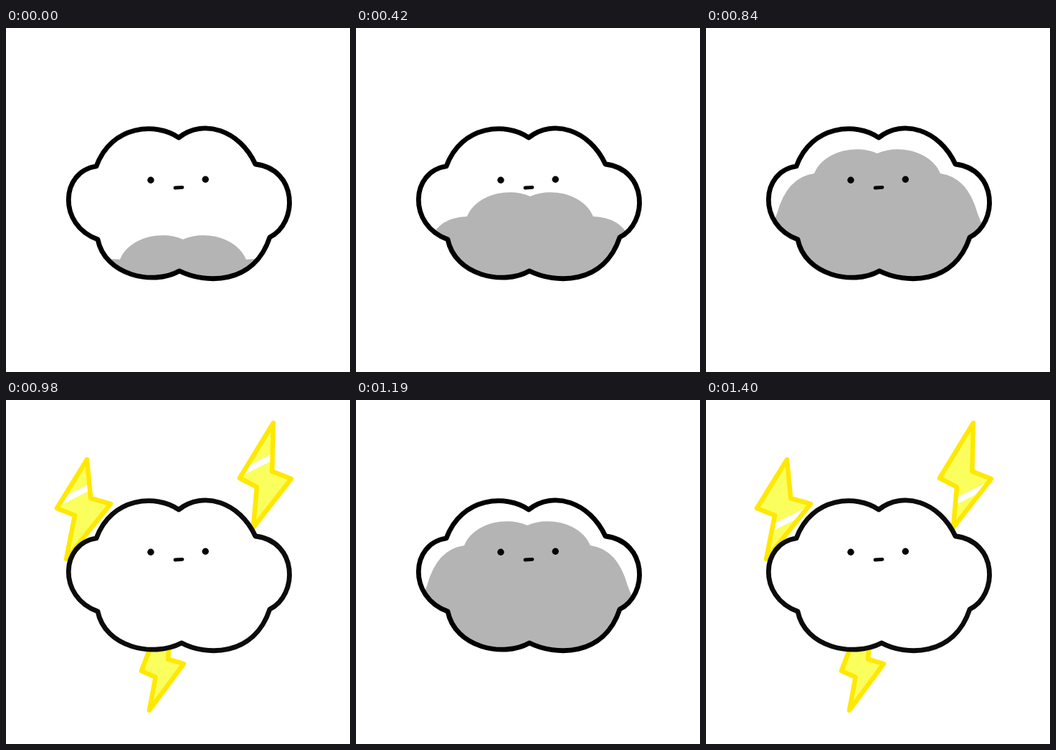
Write an HTML page with a canvas that moves like this. It is 480x480 px and loops after 1.47 s.

```html
<!DOCTYPE html>
<html lang="en">
<head>
<meta charset="utf-8">
<title>Storm cloud</title>
<style>
  html, body { margin: 0; width: 100%; height: 100%; overflow: hidden; background: #fff; }
  canvas { display: block; width: 100vmin; height: 100vmin; }
</style>
</head>
<body>
<canvas id="stage" width="480" height="480"></canvas>
<script>
const ctx = document.getElementById('stage').getContext('2d');
const LOOP = 1470;
const TICK = 70;
const POSE_TICKS = 1.5; // poses last two ticks and one tick in turn
const FULL = 8;         // pose in which the grey fill is highest

function cloudPath(notchX) {
  const p = new Path2D();
  p.moveTo(241, 153);
  p.bezierCurveTo(210, 131, 147, 135, 126, 193);
  p.bezierCurveTo(76, 200, 72, 275, 128, 295);
  p.bezierCurveTo(138, 345, 205, 360, notchX, 339);
  p.bezierCurveTo(278, 357, 346, 359, 368, 292);
  p.bezierCurveTo(408, 272, 407, 197, 348, 190);
  p.bezierCurveTo(326, 142, 275, 126, 241, 153);
  p.closePath();
  return p;
}

function line(x1, y1, x2, y2, color, width) {
  ctx.strokeStyle = color;
  ctx.lineWidth = width;
  ctx.beginPath();
  ctx.moveTo(x1, y1);
  ctx.lineTo(x2, y2);
  ctx.stroke();
}

// A mirrored cloud top that climbs evenly, cut off by the outline.
function drawFill(step, cloud) {
  const x = 247 - step;
  const y = 295 - 15 * step;
  ctx.save();
  ctx.clip(cloud);
  ctx.fillStyle = '#b4b4b4';
  ctx.beginPath();
  for (const side of [-1, 1]) {
    const notchX = x + side * 88;
    const notchY = y + 28;
    ctx.moveTo(x, y);
    ctx.bezierCurveTo(x + side * 28, y - 13, x + side * 75, y - 4, notchX, notchY);
    ctx.quadraticCurveTo(notchX + side * 38, notchY + step - 3,
                         notchX + side * 52, notchY + 8 + 6 * step);
    ctx.lineTo(x + side * 180, 362);
    ctx.lineTo(x, 362);
  }
  ctx.fill();
  ctx.restore();
}

// Four corners; the two inner corners follow from the width of the waist.
function drawBolt(top, left, tip, right, shine) {
  const dx = right[0] - left[0];
  const dy = right[1] - left[1];
  const shape = new Path2D();
  shape.moveTo(...top);
  shape.lineTo(...left);
  shape.lineTo(left[0] + dx / 3, left[1] + dy / 3 + 12);
  shape.lineTo(...tip);
  shape.lineTo(...right);
  shape.lineTo(right[0] - dx * 0.37, right[1] - dy * 0.37 - 10);
  shape.closePath();

  ctx.fillStyle = '#faff5e';
  ctx.fill(shape);
  if (shine) {
    const [x, y] = shine === 'high' ? [left[0] + 27, left[1] - 20]
                                    : [right[0] - 31, right[1] + 22];
    ctx.save();
    ctx.clip(shape);
    line(x - 30, y + 15, x + 30, y - 15, '#fff', 8.5);
    ctx.restore();
  }
  ctx.strokeStyle = '#ffe800';
  ctx.lineWidth = 6.5;
  ctx.stroke(shape);
}

function drawStorm(shine) {
  drawBolt([113, 83], [71, 151], [84, 222], [146, 145], shine);
  drawBolt([373, 32], [326, 109], [345, 178], [398, 110], shine);
  drawBolt([232, 265], [189, 378], [200, 433], [248, 368]);
}

function dot(x, y) {
  ctx.beginPath();
  ctx.arc(x, y, 4.7, 0, Math.PI * 2);
  ctx.fill();
}

function drawFace() {
  ctx.fillStyle = '#050505';
  dot(202, 212.3);
  dot(278.3, 211.3);
  line(236, 223, 246, 222.4, '#050505', 4.8);
}

function draw(time) {
  const pose = Math.floor(Math.floor((time % LOOP) / TICK) / POSE_TICKS);
  // After the fill: two flashes, a pause, two flashes.
  const beat = pose % 3;
  const storm = pose > FULL && beat < 2;
  const cloud = cloudPath(storm ? 245 : 242);

  ctx.fillStyle = '#fff';
  ctx.fillRect(0, 0, 480, 480);
  ctx.lineCap = ctx.lineJoin = 'round';

  if (storm) drawStorm(beat === 0 ? 'high' : 'low');
  ctx.fillStyle = '#fff';
  ctx.fill(cloud);
  if (!storm) drawFill(Math.min(pose, FULL), cloud);

  ctx.strokeStyle = storm ? '#0c0c0c' : '#000';
  ctx.lineWidth = 6.8;
  ctx.stroke(cloud);
  drawFace();
}

const begin = performance.now();
function tick() {
  draw(performance.now() - begin);
  requestAnimationFrame(tick);
}
tick();
</script>
</body>
</html>
```
